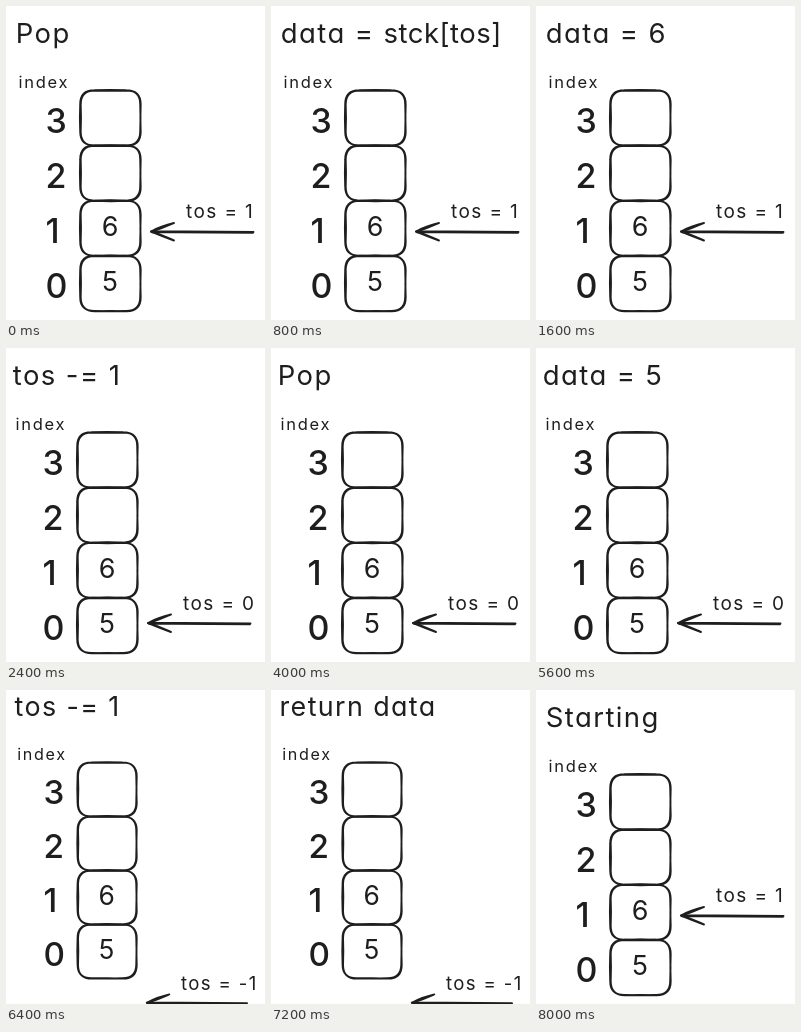
An HTML page for the animation above (8.8 s loop, 259 by 314 pixels).

```html
<!DOCTYPE html>
<html lang="en">
<head>
<meta charset="utf-8">
<title>Stack pop</title>
<style>
  html, body { margin: 0; width: 100%; height: 100%; overflow: hidden; background: #fff; }
  svg { display: block; width: 259px; height: 314px; }
  text {
    font-family: Inter, "Open Sans", sans-serif;
    font-feature-settings: "cv11";
    fill: #1e1e1e;
    white-space: pre;
  }
  path { fill: none; stroke: #1e1e1e; stroke-width: 1.9; stroke-linecap: round; stroke-linejoin: round; }
  #title { font-size: 27.5px; letter-spacing: 1.4px; }
  #value { letter-spacing: .5px; }
  .caption { font-size: 16.5px; letter-spacing: 1.7px; }
  .index { font-size: 34px; font-weight: 450; }
  .cell { font-size: 27px; text-anchor: middle; }
  #label { font-size: 19px; letter-spacing: 1.4px; }
</style>
</head>
<body>
<svg viewBox="0 0 259 314">
  <g id="scene">
    <text id="title" x="9.800" y="37"><tspan id="name"></tspan><tspan id="value"></tspan></text>
    <text class="caption" x="12.500" y="82">index</text>
    <g id="stack"></g>
    <g id="pointer">
      <text id="label" x="180" y="212"></text>
      <path d="M247.500 226Q196 225 145 225.500M247 226.800Q190 226 146 226.300"/>
      <path d="M168 217Q155 220 145 225.500Q156 230 168 234.500M167 217.500Q157 222 146 225.500Q155 229 167 234"/>
    </g>
  </g>
</svg>
<script>
const STEP = 800;
const $ = id => document.getElementById(id);

// scene placement, pointer drop, top-of-stack value
const views = [
  ["", 0, 1],
  ["translate(-3 0)", 49.5, 0],
  ["translate(-1 -10) scale(.978)", 104.5, -1]
];

// title and view index
const steps = [
  ["Pop", 0], ["data = stck[tos]", 0], ["data = 6", 0], ["tos -= 1", 1], ["return data", 1],
  ["Pop", 1], ["data = stck[tos]", 1], ["data = 5", 1], ["tos -= 1", 2], ["return data", 2],
  ["Starting", 0]
];

// rounded square with slightly bowed sides
const outline = (x, y, bow) =>
  `M${x + 14} ${y}q16 ${-bow} 32 0q14 0 14 14q${bow} 14 0 27.200q0 14 -14 14` +
  `q-16 ${bow} -32 0q-14 0 -14 -14q${-bow} -14 0 -27.200q0 -14 14 -14z`;

const cells = ["5", "6", "", ""];
$("stack").innerHTML = cells.map((value, i) => {
  const y = 249.8 - 55.2 * i;
  return `<path d="${outline(74.2, y, .6)}${outline(74.7, y + .3, -.6)}"/>
    <text class="index" x="39.500" y="${y + 42.5}">${i}</text>
    <text class="cell" x="104" y="${y + 35.5}">${value}</text>`;
}).join("");

let shown = -1;
function draw(now) {
  const i = Math.floor(now / STEP) % steps.length;
  if (i !== shown) {
    shown = i;
    const [title, view] = steps[i];
    const [place, drop, tos] = views[view];
    const cut = title.startsWith("data") ? 7 : title.length;
    $("name").textContent = title.slice(0, cut);
    $("value").textContent = title.slice(cut);
    $("label").textContent = `tos = ${tos}`;
    $("scene").setAttribute("transform", place);
    $("pointer").setAttribute("transform", `translate(0 ${drop})`);
  }
  requestAnimationFrame(draw);
}
draw(performance.now());
</script>
</body>
</html>
```
